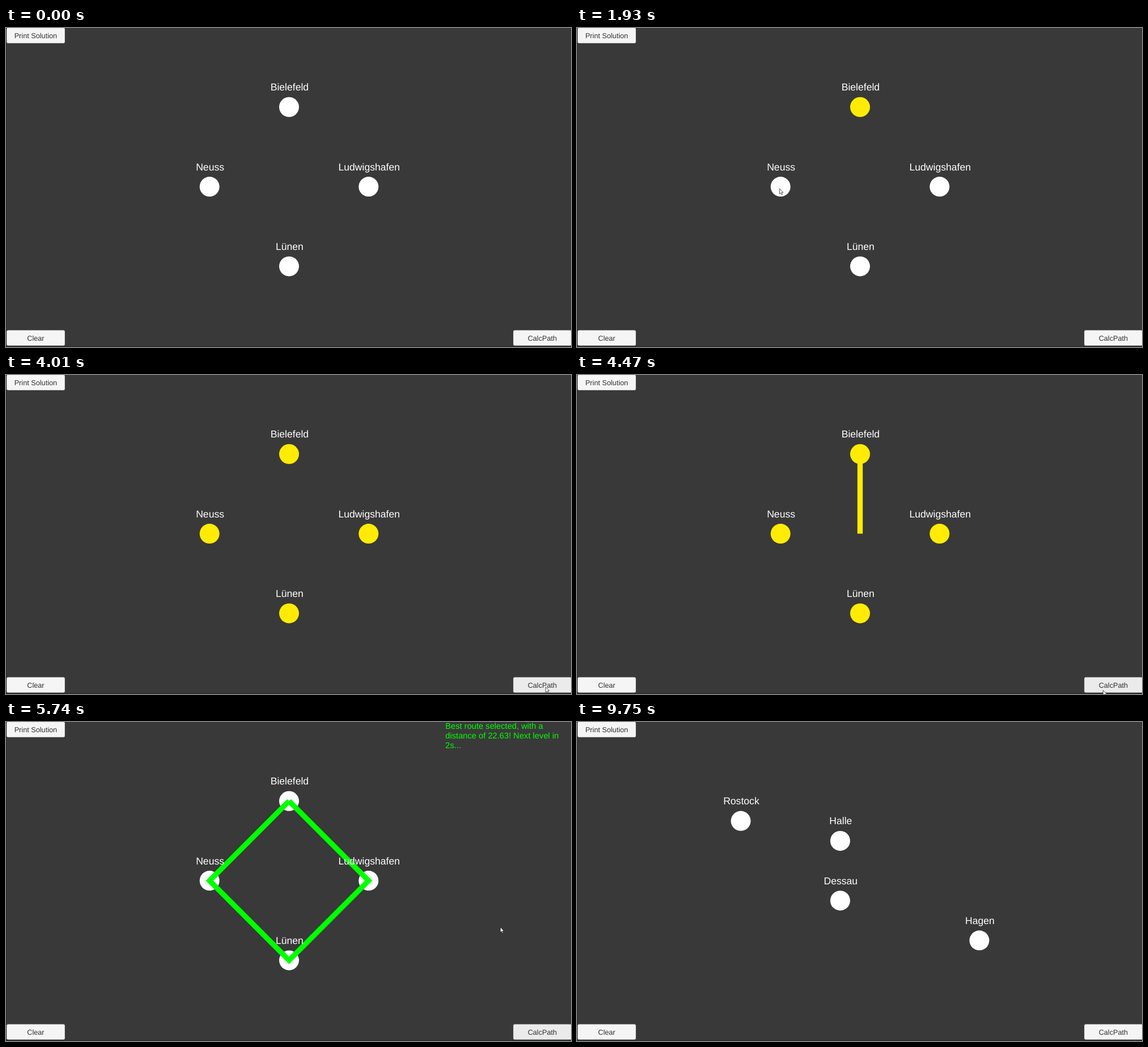
An HTML page that plays this animation: 997 px wide and 562 px high, repeating every 9880 ms.

```html
<!DOCTYPE html>
<html lang="en">
<head>
<meta charset="utf-8">
<title>Route puzzle</title>
<style>
  html, body { margin: 0; width: 100%; height: 100%; overflow: hidden; background: #393939; }
  svg { display: block; width: 997px; height: 562px; font-family: "Liberation Sans", Arial, sans-serif; font-kerning: none; text-rendering: geometricPrecision; }
  .button rect { fill: #f5f5f5; }
  .button text { fill: #323232; font-size: 12.7px; text-anchor: middle; }
  .label { fill: #fff; font-size: 17.6px; text-anchor: middle; }
  #message { fill: #0f0; font-size: 14.7px; }
  #route { fill: none; stroke-width: 9.4; stroke-linejoin: miter; stroke-miterlimit: 8; }
</style>
</head>
<body>
<svg viewBox="0 0 997 562">
  <rect width="997" height="562" fill="#393939"/>
  <path d="M0 0H1V562H0ZM0 560.5H997V562H0Z" fill="#2b2b2b"/>
  <g id="buttons"></g>
  <g id="dots"></g>
  <polyline id="route"/>
  <g id="labels"></g>
  <g id="message"></g>
  <path id="cursor" d="M.3 .4V9.8L2.4 7.8L4 11.2L5.5 10.5L3.9 7.2H6.8Z"
        fill="#fff" stroke="#111" stroke-width=".7" stroke-linejoin="round"/>
</svg>
<script>
const LOOP = 9880, FRAMES = 148, FRAME = LOOP / FRAMES;
const YELLOW = '#ffeb04', GREEN = '#00ff00', WHITE = '#fff';
const ENTER = 130, HOVER = 3870, PRESS = 4200, DRAW = 4400, SOLVED = 5738, NEXT_LEVEL = 7808;
const STAGE = (SOLVED - DRAW) / 4;
const CENTER = [499.5, 279.6], UNIT = 35.08;

// Places a city by grid cell; `at` is its click time, `aim` the pointer's offset from its middle.
const city = (name, col, row, at, aim) =>
  ({ name, x: CENTER[0] + col * UNIT, y: CENTER[1] - row * UNIT, at, aim });

const levels = [
  [
    city('Bielefeld', 0, 4, 1330, [0, -5]),
    city('Neuss', -4, 0, 2000, [-2, 3]),
    city('Lünen', 0, -4, 2468, [-1, -9]),
    city('Ludwigshafen', 4, 0, 3200, [8, -5])
  ],
  [
    city('Rostock', -6, 3),
    city('Halle', -1, 2),
    city('Dessau', -1, -1),
    city('Hagen', 6, -3)
  ]
];

const move = (from, to, x, y) => ({ from, to, x, y });

// From each click the pointer travels to the next city and waits there briefly.
const cityMoves = levels[0].map((c, i, all) =>
  move(i ? all[i - 1].at : 740, c.at - 2 * FRAME, c.x + c.aim[0], c.y + c.aim[1]));

const moves = [
  move(ENTER, 330, 311, 337),
  move(330, 465, 537, 344),
  ...cityMoves,
  move(3200, HOVER, 958, 548),
  move(HOVER, 4340, 928, 555),
  move(4480, 5250, 872, 361),
  move(8480, 8870, 869, 356),
  move(9350, 9746, 984, 560)
];

const $ = id => document.getElementById(id);

function add(parent, tag, attrs, text) {
  const el = document.createElementNS('http://www.w3.org/2000/svg', tag);
  for (const key in attrs) el.setAttribute(key, attrs[key]);
  if (text) el.textContent = text;
  return parent.appendChild(el);
}

function addButton(x, y, caption) {
  const g = add($('buttons'), 'g', { class: 'button' });
  const face = add(g, 'rect', { x, y, width: 102.6, height: 27, rx: 2.5 });
  add(g, 'text', { x: x + 51.2, y: y + 18.1 }, caption);
  return face;
}

addButton(1.2, -.3, 'Print Solution');
addButton(1.2, 532.6, 'Clear');
const calc = addButton(895.2, 532.6, 'CalcPath');

['Best route selected, with a', 'distance of 22.63! Next level in', '2s...']
  .forEach((line, i) => add($('message'), 'text', { x: 775.3, y: 12.2 + i * 16.9 }, line));

const groups = levels.map(cities => {
  const dots = add($('dots'), 'g');
  const labels = add($('labels'), 'g');
  for (const c of cities) {
    c.dot = add(dots, 'circle', { cx: c.x, cy: c.y, r: 17.5, fill: WHITE });
    add(labels, 'text', { class: 'label', x: c.x + .9, y: c.y - 29.1 }, c.name);
  }
  return [dots, labels];
});

const show = (el, on) => el.setAttribute('visibility', on ? 'visible' : 'hidden');

function ease(u) {
  u = Math.min(1, Math.max(0, u));
  return u * u * (3 - 2 * u);
}

function pointerAt(t) {
  let x = 900, y = 553;
  for (const m of moves) {
    const e = ease((t - m.from) / (m.to - m.from));
    x += (m.x - x) * e;
    y += (m.y - y) * e;
  }
  return [x, y];
}

// The open end of the unfinished route rests at the centre of the stage.
function routeAt(t) {
  const stage = Math.floor((t - DRAW) / STAGE) + 1;
  const points = levels[0].map(c => [c.x, c.y]);
  return t >= SOLVED ? [...points, points[0]] : [...points.slice(0, stage), CENTER];
}

function calcColor(t) {
  if (t >= PRESS && t < DRAW) return '#c6c6c6';
  return t >= HOVER && t < NEXT_LEVEL ? '#ebebeb' : '#f5f5f5';
}

function draw(t) {
  const level = t < NEXT_LEVEL ? 0 : 1;
  const solved = t >= SOLVED;
  groups.forEach((group, i) => group.forEach(el => show(el, i === level)));
  for (const c of levels[0]) c.dot.setAttribute('fill', t >= c.at && !solved ? YELLOW : WHITE);

  const routeOn = t >= DRAW && level === 0;
  show($('route'), routeOn);
  if (routeOn) {
    $('route').setAttribute('points', routeAt(t).join(' '));
    $('route').setAttribute('stroke', solved ? GREEN : YELLOW);
  }
  show($('message'), solved && level === 0);
  calc.style.fill = calcColor(t);

  show($('cursor'), t >= ENTER);
  $('cursor').setAttribute('transform', `translate(${pointerAt(t)})`);
}

const start = performance.now();
function tick() {
  const t = (performance.now() - start) % LOOP;
  draw(Math.floor((t + 6) / FRAME) % FRAMES * FRAME);
  requestAnimationFrame(tick);
}
tick();
</script>
</body>
</html>
```
